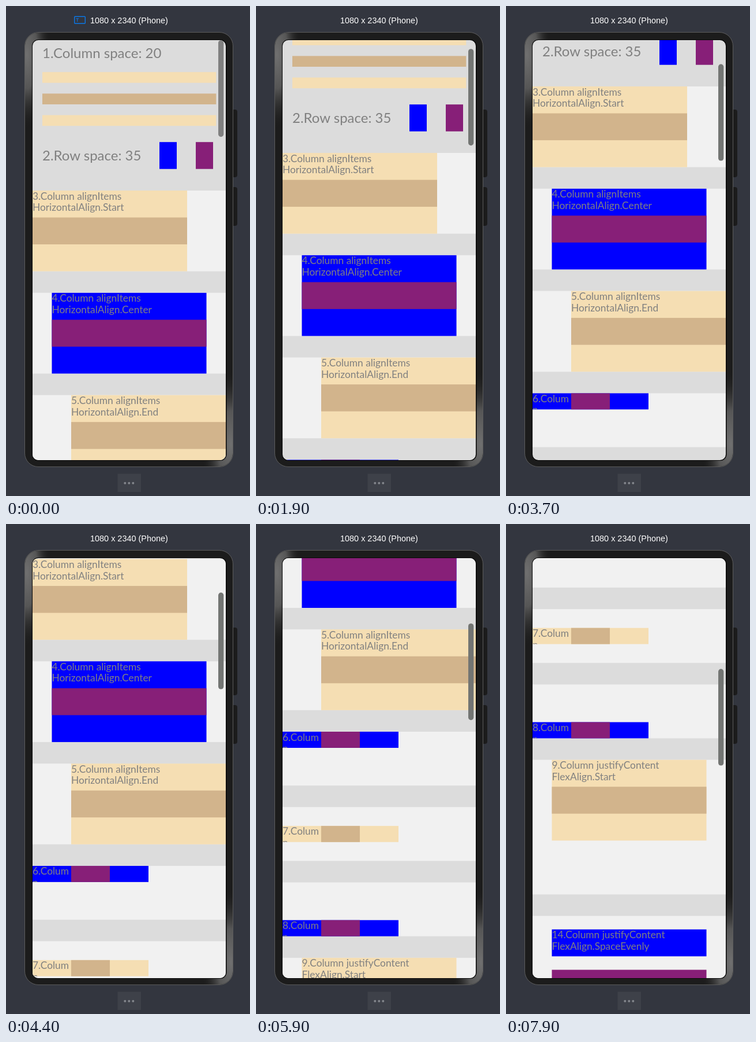
These frames come from a looping animation (423 by 847 pixels, 8000 ms). An HTML page:

```html
<!DOCTYPE html>
<html lang="en">
<head>
<meta charset="utf-8">
<title>Layout preview</title>
<style>
@property --y { syntax: "<number>"; inherits: true; initial-value: 0; }
html, body { margin: 0; width: 100%; height: 100%; overflow: hidden; background: #33363f; }
#stage { display: block; width: 423px; height: 847px; animation: drag 8s infinite; }
#page { transform: translateY(calc(var(--y) * -1px)); }
#bar { transform: translateY(calc(var(--y) * .2298px)); fill: #808080; animation: hover 8s step-end infinite; }
#icon { fill: none; stroke: #0b78e8; animation: hide 8s step-end infinite; }
.head { font: 14.45px "Liberation Sans", Arial, sans-serif; fill: #fff; }
.big, .small { font-family: Lato, "Open Sans", sans-serif; fill: #808080; }
.big { font-size: 24px; }
.small { font-size: 17.35px; }
.paper { fill: #f1f1f1; }
.wheat { fill: #f5deb3; }
.tan { fill: #d2b48c; }
.blue { fill: #00f; }
.plum { fill: #871f78; }

@keyframes hide { 6.25%, 100% { visibility: hidden; } }
@keyframes hover { 8.75%, 100% { fill: #737573; } }
/* The thumb is dragged in bursts, one jump every 100 ms */
@keyframes drag {
  0% { --y: 0; animation-timing-function: step-end; }
  15% { --y: 0; animation-timing-function: steps(4, start); }
  20% { --y: 52; animation-timing-function: step-end; }
  23.75% { --y: 52; animation-timing-function: steps(1, start); }
  25% { --y: 65; animation-timing-function: steps(12, start); }
  40% { --y: 171.2; animation-timing-function: step-end; }
  46.25% { --y: 171.2; animation-timing-function: steps(1, start); }
  47.5% { --y: 180; animation-timing-function: steps(4, start); }
  52.5% { --y: 232.3; animation-timing-function: step-end; }
  53.75% { --y: 232.3; animation-timing-function: steps(9, start); }
  65% { --y: 350; animation-timing-function: step-end; }
  67.5% { --y: 350; animation-timing-function: steps(6, start); }
  75% { --y: 490.4; animation-timing-function: steps(2, start); }
  77.5% { --y: 522.6; animation-timing-function: step-end; }
  78.75% { --y: 522.6; animation-timing-function: steps(8, start); }
  88.75% { --y: 652.4; animation-timing-function: steps(7, start); }
  97.5% { --y: 810; animation-timing-function: step-end; }
  98.75% { --y: 810; animation-timing-function: steps(1, start); }
  100% { --y: 832.6; }
}
</style>
</head>
<body>
<svg id="stage" viewBox="0 0 423 847" xmlns="http://www.w3.org/2000/svg">
  <defs>
    <radialGradient id="shine">
      <stop offset="0" stop-color="#707070"/>
      <stop offset=".45" stop-color="#565656"/>
      <stop offset="1" stop-color="#1a1a1a" stop-opacity="0"/>
    </radialGradient>
    <clipPath id="body"><rect x="33" y="46" width="360" height="750" rx="23"/></clipPath>
    <clipPath id="screen"><rect x="46" y="59" width="335" height="726" rx="10"/></clipPath>
  </defs>

  <rect width="423" height="847" fill="#33363f"/>
  <g id="icon">
    <rect x="118.7" y="18.2" width="18.6" height="12" rx="1" stroke-width="1.4"/>
    <path d="M121.3 21.8h5M123.8 21.8v5.4"/>
  </g>
  <text class="head" x="146" y="30">1080 x 2340 (Phone)</text>

  <g fill="#1c1c1c">
    <rect x="388" y="179" width="13" height="117" rx="4"/>
    <rect x="388" y="313" width="13" height="67" rx="4"/>
    <rect x="32.5" y="45.5" width="361" height="751" rx="23.5" stroke="#5c5c5c"/>
  </g>
  <g clip-path="url(#body)" fill="url(#shine)">
    <ellipse cx="36" cy="84" rx="42" ry="130"/>
    <ellipse cx="390" cy="758" rx="52" ry="130"/>
  </g>
  <rect x="45" y="58" width="337.5" height="728" rx="11" fill="#080808"/>

  <g clip-path="url(#screen)">
    <rect x="46" y="59" width="335" height="726" fill="#dcdcdc"/>
    <g id="page">
      <text class="big" x="63" y="90.3">1.Column space: 20</text>
      <rect class="wheat" x="63" y="114.2" width="301.3" height="18.6"/>
      <rect class="tan" x="63" y="151.4" width="301.3" height="18.6"/>
      <rect class="wheat" x="63" y="188.6" width="301.3" height="18.6"/>
      <text class="big" x="63" y="267">2.Row space: 35</text>
      <rect class="blue" x="266" y="235.2" width="30" height="46.5"/>
      <rect class="plum" x="329" y="235.2" width="30" height="46.5"/>
      <g id="blocks"></g>
    </g>
    <rect id="bar" x="368" y="59.2" width="9.3" height="167" rx="4.6"/>
  </g>

  <rect x="193.5" y="808.5" width="40.5" height="31.5" fill="#3e4149"/>
  <g fill="#83868c">
    <circle cx="206.3" cy="824.7" r="2"/>
    <circle cx="213.3" cy="824.7" r="2"/>
    <circle cx="220.3" cy="824.7" r="2"/>
  </g>
</svg>

<script>
const VP = 335 / 360;          // screen pixels per layout unit
const GAP = 40 * VP, BAND = 50 * VP, CELL = 30 * VP;
const pairs = [["wheat", "tan"], ["blue", "plum"]];
let top_ = 319, html = "";

const rect = (cls, x, y, w, h) =>
  `<rect class="${cls}" x="${x}" y="${y}" width="${w}" height="${h}"/>`;
const label = (x, y, lines) => lines.map((s, i) =>
  `<text class="small" x="${x}" y="${y + 15.5 + i * 19.5}">${s}</text>`).join("");

function section(height, draw) {
  html += rect("paper", 46, top_, 335, height * VP) + draw(top_);
  top_ += height * VP + GAP;
}

// Three stacked bands; space is the free room above and between them
function column(height, x, tone, lines, space = 0) {
  section(height, y => {
    const [a, b] = pairs[tone], s = space * VP;
    return rect(a, x, y + s, 268, space ? BAND : 3 * BAND)
      + rect(b, x, y + 2 * s + BAND, 268, BAND)
      + (space ? rect(a, x, y + 3 * s + 2 * BAND, 268, BAND) : "")
      + label(x, y + s, lines);
  });
}

// Three cells side by side; the label wraps and is cut off by its cell
function row(tone, shift, name) {
  section(100, y => {
    const [a, b] = pairs[tone], t = y + shift * VP;
    return rect(a, 46, t, 201, CELL) + rect(b, 113, t, 67, CELL)
      + `<svg x="46" y="${t}" width="67" height="${CELL}">${label(0, 0, [name, "n"])}</svg>`;
  });
}

column(150, 46, 0, ["3.Column alignItems", "HorizontalAlign.Start"]);
column(150, 79.5, 1, ["4.Column alignItems", "HorizontalAlign.Center"]);
column(150, 113, 0, ["5.Column alignItems", "HorizontalAlign.End"]);
row(1, 0, "6.Colum");
row(0, 35, "7.Colum");
row(1, 70, "8.Colum");
column(250, 79.5, 0, ["9.Column justifyContent", "FlexAlign.Start"]);
column(250, 79.5, 1, ["14.Column justifyContent", "FlexAlign.SpaceEvenly"], 25);
document.getElementById("blocks").innerHTML = html;
</script>
</body>
</html>
```
